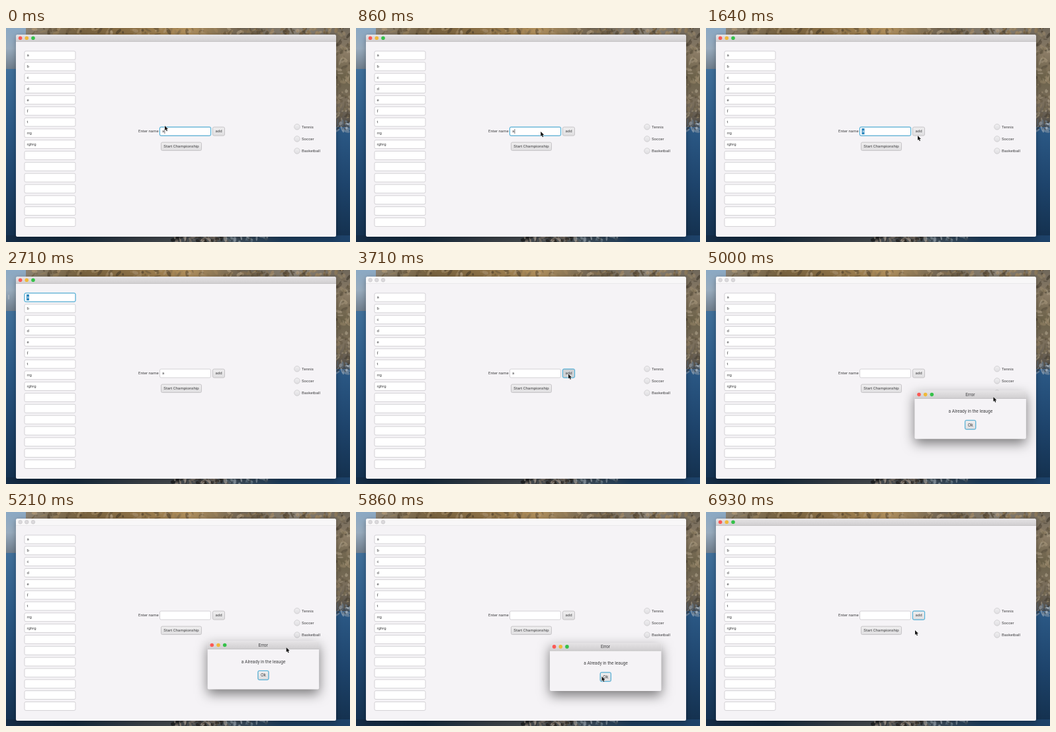
Animation of 520 by 324 pixels, one loop 7 s. Source, as an HTML page with a canvas:

```html
<!DOCTYPE html>
<html lang="en">
<head>
<meta charset="utf-8">
<title>Championship form</title>
<style>
  html, body { margin: 0; width: 100%; height: 100%; overflow: hidden; }
  canvas { display: block; width: 520px; height: 324px; }
</style>
</head>
<body>
<canvas width="520" height="324"></canvas>
<script>
const canvas = document.querySelector('canvas');
let ctx = canvas.getContext('2d');

const LOOP = 7000, STEP = 1000 / 14;
const PANEL = '#f5f3f6', INK = '#424244', BORDER = '#d3d1d5', FOCUS = '#4db0da';
const LIGHTS = ['#fb5a55', '#f0b93a', '#35c14a'];
const NAMES = ['a', 'b', 'c', 'd', 'e', 'f', 't', 'rrg', 'rghrg'];
const SPORTS = ['Tennis', 'Soccer', 'Basketball'];

// Moments at which the state changes, in ms
const SELECT_NAME = 1000, FOCUS_FIRST = 2280, FOCUS_ADD = 3140, PRESS_ADD = 3290;
const DEACTIVATE = 3640, OPEN = 3780, GRAB = 4857, DROP = 5286, CLOSE = 6640;

// Where the pointer goes
const HOME = [240, 148], ADD = [321, 157.5], BELOW_ADD = [320, 163], LABEL = [221, 156];
const FIRST = [40, 40], EDGE = [4, 41], TITLE_BAR = [369, 175.5], FAR = [457, 198];
const RELEASE = [412, 207.5], NEAR_OK = [392, 226], OK = [371.5, 249], REST = [316, 179];

const MOVES = [
  { from: 70, to: 357, place: ADD },
  { from: 571, to: 1214, place: LABEL },
  { from: 1286, to: 1640, place: BELOW_ADD },
  { from: 2000, to: 2286, place: FIRST },
  { from: 2286, to: 2430, place: EDGE },
  { from: 2780, to: 3210, place: ADD },
  { from: 4710, to: GRAB, place: TITLE_BAR },
  { from: GRAB, to: 5071, place: FAR },
  { from: 5071, to: DROP, place: RELEASE },
  { from: DROP, to: 5357, place: NEAR_OK },
  { from: 5430, to: 5857, place: OK },
  { from: CLOSE, to: 6929, place: REST }
];

function pointerAt(t) {
  return MOVES.reduce((at, { from, to, place }) => {
    const p = Math.min(1, Math.max(0, (t - from) / (to - from)));
    const eased = p * p * (3 - 2 * p);
    return at.map((v, axis) => v + (place[axis] - v) * eased);
  }, HOME);
}

function rect(x, y, w, h, fill) {
  ctx.fillStyle = fill;
  ctx.fillRect(x, y, w, h);
}

function box(x, y, w, h, r, fill, stroke) {
  ctx.beginPath();
  ctx.roundRect(x, y, w, h, r);
  if (fill) { ctx.fillStyle = fill; ctx.fill(); }
  if (stroke) { ctx.strokeStyle = stroke; ctx.lineWidth = 1; ctx.stroke(); }
}

function disc(x, y, r, fill, stroke) {
  ctx.beginPath();
  ctx.arc(x, y, r, 0, 7);
  ctx.fillStyle = fill;
  ctx.fill();
  if (stroke) { ctx.strokeStyle = stroke; ctx.lineWidth = 0.7; ctx.stroke(); }
}

function blend(gradient, colors) {
  colors.forEach((c, i) => gradient.addColorStop(i / (colors.length - 1), c));
  return gradient;
}
const down = (y0, y1, ...colors) => blend(ctx.createLinearGradient(0, y0, 0, y1), colors);
const across = (x0, x1, ...colors) => blend(ctx.createLinearGradient(x0, 0, x1, 0), colors);

function label(text, x, y, size = 6.05, align = 'left', color = INK) {
  ctx.font = `${size}px Roboto, Arial, sans-serif`;
  ctx.textAlign = align;
  ctx.fillStyle = color;
  ctx.fillText(text, x, y + size * 0.32);
}

function focusRing(x, y, w, h) {
  box(x - 0.5, y - 0.5, w + 1, h + 1, 2, null, 'rgba(120,200,232,.35)');
  box(x, y, w, h, 2, null, FOCUS);
}

function field(x, y, text, focused, selected) {
  box(x + 0.5, y - 6.5, 77, 13, 2, '#fff', BORDER);
  if (focused) focusRing(x + 0.5, y - 6.5, 77, 13);
  if (selected) rect(x + 3.5, y - 4.5, 4, 9, '#2b86bd');
  label(text, x + 4, y, 6.05, 'left', selected ? '#fff' : INK);
}

function button(text, cx, cy, w, h, { focused, pressed, size } = {}) {
  const fill = pressed ? '#cfd2d5' : down(cy - h / 2, cy + h / 2, '#efeeef', '#dfdee0');
  box(cx - w / 2, cy - h / 2, w, h, 2, fill, '#c6c4c7');
  if (focused) focusRing(cx - w / 2, cy - h / 2, w, h);
  label(text, cx, cy, size, 'center');
}

function trafficLights(x, y, active) {
  LIGHTS.forEach((c, i) => disc(x + i * 9.7, y, 2.8, active ? c : '#dbd9dc', active ? null : '#c9c7ca'));
}

function titleBar(x, y, w, h, active) {
  box(x, y, w, h, [3, 3, 0, 0], active ? down(y, y + h, '#e6e4e6', '#cfcdcf') : '#f8f7f8');
  rect(x, y + h - 0.5, w, 0.6, active ? '#bab8bb' : '#e2e0e3');
  trafficLights(x + 6.6, y + h / 2 - 0.2, active);
}

// Soft coastal scene: sky and hills above, rocks on the right, sea below
function makeBackdrop() {
  const layer = document.createElement('canvas');
  layer.width = 520;
  layer.height = 324;
  const screen = ctx;
  ctx = layer.getContext('2d');

  let seed = 7;
  const random = () => (seed = seed * 16807 % 2147483647) / 2147483647;
  const blotches = (x, y, w, h, count, hue, saturation, light, spread) => {
    for (let i = 0; i < count; i++) {
      ctx.beginPath();
      ctx.ellipse(x + random() * w, y + random() * h, 1 + random() * 5, 0.7 + random() * 2, random() * 3, 0, 7);
      ctx.fillStyle = `hsla(${hue},${saturation}%,${light + (random() - 0.5) * spread}%,.6)`;
      ctx.fill();
    }
  };

  rect(0, 0, 520, 324, down(60, 324, '#41709b', '#2c5a87', '#1e446c', '#132f4c'));
  rect(0, 0, 60, 62, down(0, 62, '#8ba9c4', '#98abbd', '#6f7d8c'));
  ctx.filter = 'blur(0.7px)';
  rect(30, 0, 490, 14, across(30, 520, '#8d8373', '#77623f', '#8b6f45', '#b1905c', '#6e6353', '#8a8276', '#6b6357'));
  rect(499, 0, 24, 150, down(0, 150, '#6f675a', '#8b7c66', '#6b6149', '#7b6f5d', '#4d4a46'));
  blotches(40, 0, 470, 10, 170, 36, 26, 42, 42);
  blotches(499, 8, 21, 136, 110, 38, 18, 41, 42);
  blotches(499, 142, 21, 14, 22, 210, 16, 48, 70);
  rect(0, 314, 520, 12, across(0, 520, '#142c46', '#152a3d', '#3a4047', '#4f5558', '#1d3c5b', '#1d4269'));
  blotches(245, 315, 90, 9, 55, 30, 12, 36, 70);
  blotches(335, 315, 60, 9, 25, 205, 14, 48, 70);
  ctx.filter = 'none';

  ctx.shadowColor = 'rgba(0,0,0,.3)';
  ctx.shadowBlur = 8;
  ctx.shadowOffsetY = 2;
  box(15, 10, 484, 306, [3, 3, 2, 2], PANEL);
  ctx = screen;
  return layer;
}

function mainWindow(t) {
  const nameFocus = t < FOCUS_FIRST;
  const firstFocus = !nameFocus && t < FOCUS_ADD;
  const addFocus = t >= FOCUS_ADD && t < OPEN || t >= CLOSE;

  titleBar(15, 10, 484, 10.8, t < DEACTIVATE || t >= CLOSE);
  for (let i = 0; i < 16; i++) {
    const focused = i === 0 && firstFocus;
    field(27.5, 41.5 + i * 16.83, NAMES[i] || '', focused, focused);
  }

  label('Enter name', 200, 156.5);
  field(232, 156.5, t < OPEN ? 'a' : '', nameFocus, nameFocus && t >= SELECT_NAME);
  if (t < SELECT_NAME) rect(239.6, 153, 0.7, 7, INK);
  button('add', 321.5, 156.5, 18, 13, { focused: addFocus, pressed: t >= PRESS_ADD && t < OPEN });
  button('Start Championship', 265, 179.3, 61, 12.4);
  SPORTS.forEach((sport, i) => {
    const y = 149.7 + i * 18.2;
    disc(440, y, 4.3, down(y - 4, y + 4, '#efeef0', '#e0dfe2'), '#c8c6c9');
    label(sport, 447, y);
  });
}

function errorDialog(x, y) {
  ctx.save();
  ctx.translate(x, y);
  ctx.save();
  ctx.shadowColor = 'rgba(0,0,0,.5)';
  ctx.shadowBlur = 18;
  ctx.shadowOffsetY = 7;
  box(0, 0, 168.5, 73, [3, 3, 2, 2], PANEL);
  ctx.restore();
  titleBar(0, 0, 168.5, 12.2, true);
  label('Error', 84, 6.3, 6.65, 'center');
  label('a Already in the leauge', 84.5, 31, 6.65, 'center');
  button('Ok', 84.3, 51.7, 16, 13.5, { focused: true, size: 6.65 });
  ctx.restore();
}

// The dialog keeps its place under the pointer only while it is dragged
function dialogAt(t) {
  const [x, y] = pointerAt(Math.min(DROP, Math.max(GRAB, t)));
  return [x - 119, y - 9.5];
}

const ARROW = new Path2D('M0 0v7l1.6-1.4 1.2 2.7 1.2-.6-1.1-2.5 2.1-.2z');

function pointer(x, y, beam) {
  if (beam) {
    rect(x - 0.4, y - 3.5, 0.9, 7, '#c3c9d0');
    return;
  }
  ctx.save();
  ctx.translate(x, y);
  ctx.strokeStyle = 'rgba(255,255,255,.8)';
  ctx.lineWidth = 1;
  ctx.stroke(ARROW);
  ctx.fillStyle = '#161616';
  ctx.fill(ARROW);
  ctx.restore();
}

const backdrop = makeBackdrop();

function draw(now) {
  // The picture changes 14 times a second
  const t = Math.floor((now % LOOP + 5) / STEP) * STEP % LOOP;
  ctx.drawImage(backdrop, 0, 0);
  mainWindow(t);
  if (t >= OPEN && t < CLOSE) errorDialog(...dialogAt(t));
  pointer(...pointerAt(t), t > 2350 && t < 2790);
}

let start;
function tick(now) {
  start ??= now;
  draw(now - start);
  requestAnimationFrame(tick);
}
requestAnimationFrame(tick);
</script>
</body>
</html>
```
